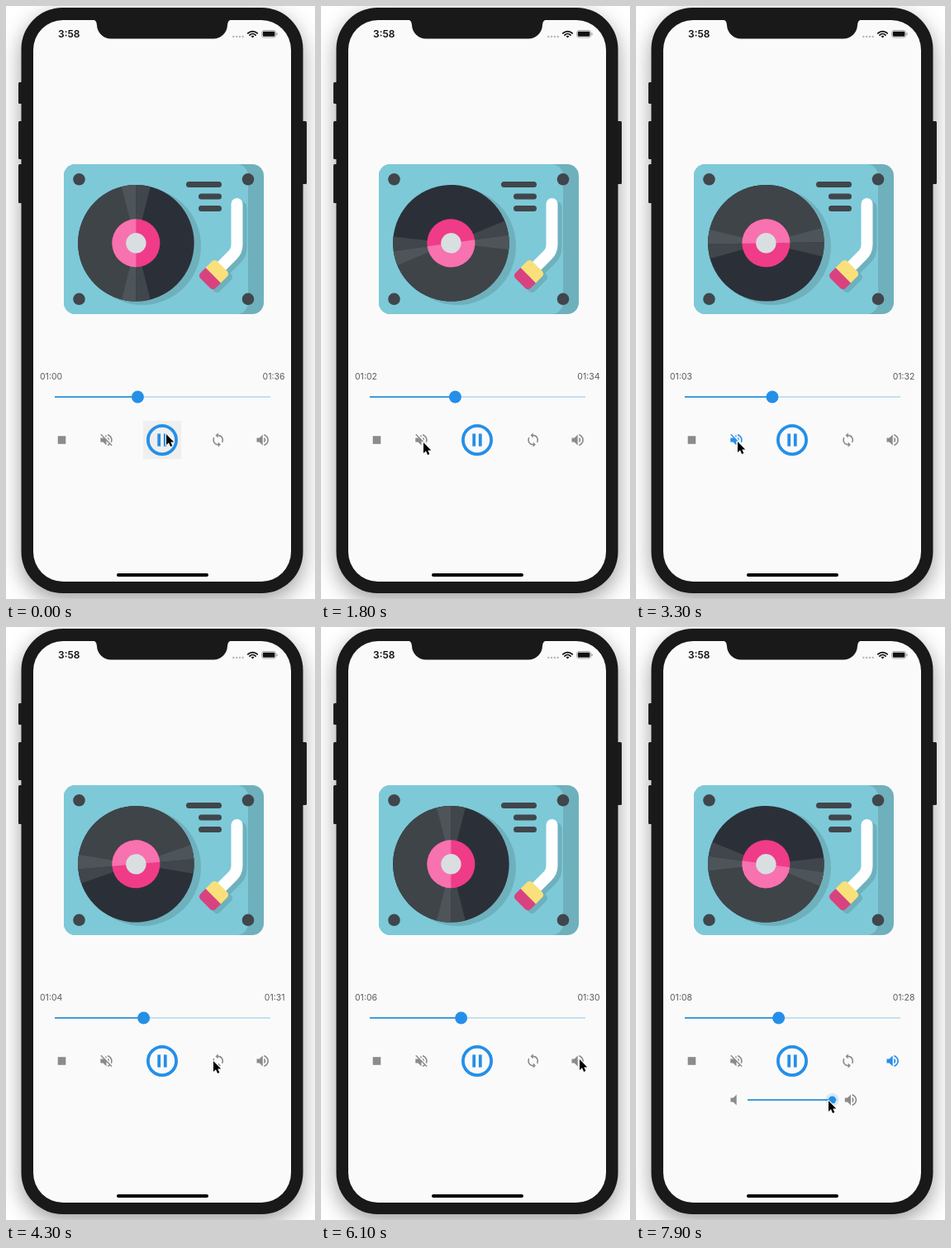
An HTML page with a canvas for the animation above (8000 ms loop, 374x716 px).

```html
<!DOCTYPE html>
<html lang="en">
<head>
<meta charset="utf-8">
<title>Music player</title>
<style>
html, body { margin: 0; width: 100%; height: 100%; overflow: hidden; background: #fff; }
canvas { display: block; width: 374px; height: 716px; }
</style>
</head>
<body>
<canvas id="stage"></canvas>
<script>
const W = 374, H = 716, LOOP = 8000, TAU = Math.PI * 2;
const BLUE = '#258fe8', GREY = '#8b8b8b', SLATE = '#40464b', TEAL = '#7dc9d8', SHADE = '#6fb0bd';
const canvas = document.getElementById('stage');
const ctx = canvas.getContext('2d');
const dpr = window.devicePixelRatio || 1;
canvas.width = W * dpr;
canvas.height = H * dpr;

// 24-unit icons
const icons = {
  stop: 'M6 6h12v12H6z',
  off: 'M16.5 12c0-1.77-1.02-3.29-2.5-4.03v2.21l2.45 2.45c.03-.2.05-.41.05-.63zm2.5 0c0 .94-.2 1.82-.54 2.64l1.51 1.51C20.63 14.91 21 13.5 21 12c0-4.28-2.99-7.86-7-8.77v2.06c2.89.86 5 3.54 5 6.71zM4.27 3L3 4.27 7.73 9H3v6h4l5 5v-6.73l4.25 4.25c-.67.52-1.42.93-2.25 1.18v2.06c1.38-.31 2.63-.95 3.69-1.81L19.73 21 21 19.73l-9-9L4.27 3zM12 4L9.91 6.09 12 8.18V4z',
  loop: 'M12 4V1L8 5l4 4V6c3.31 0 6 2.69 6 6 0 1.01-.25 1.97-.7 2.8l1.46 1.46C19.54 15.03 20 13.57 20 12c0-4.42-3.58-8-8-8zm0 14c-3.31 0-6-2.69-6-6 0-1.01.25-1.97.7-2.8L5.24 7.74C4.46 8.97 4 10.43 4 12c0 4.42 3.58 8 8 8v3l4-4-4-4v3z',
  up: 'M3 9v6h4l5 5V4L7 9H3zm13.5 3c0-1.77-1.02-3.29-2.5-4.03v8.05c1.48-.73 2.5-2.25 2.5-4.02zM14 3.23v2.06c2.89.86 5 3.54 5 6.71s-2.11 5.85-5 6.71v2.06c4.01-.91 7-4.49 7-8.77s-2.99-7.86-7-8.77z',
  low: 'M7 9v6h4l5 5V4l-5 5H7z'
};
for (const k in icons) icons[k] = new Path2D(icons[k]);
const arrow = new Path2D('M0 0V13L3 10.2 5.1 15 7.4 14 5.3 9.4H9.3z');

const spin = [[0, 0], [1.8, 622], [3.3, 1169], [4.3, 1525], [6.1, 2160], [7.2, 2552], [8, 2833]];
const pointer = [
  [0, 194, 517], [0.4, 194, 517], [1.3, 124, 527], [1.9, 124, 527], [2.2, 123, 526], [3.6, 123, 526],
  [4.2, 251, 524], [5.3, 251, 524], [5.9, 313, 522], [6.6, 313, 522], [7.2, 257, 557],
  [7.5, 240, 571], [7.6, 239, 572], [7.9, 233, 572]
];

function keyed(keys, t, col, ease = u => u) {
  const i = keys.findIndex(k => k[0] > t);
  if (i < 0) return keys[keys.length - 1][col];
  const a = keys[i - 1], b = keys[i];
  return a[col] + (b[col] - a[col]) * ease((t - a[0]) / (b[0] - a[0]));
}
const smooth = u => u * u * (3 - 2 * u);
const within = (t, a, b) => t >= a && t < b;

function box(x, y, w, h, r, fill) {
  ctx.fillStyle = fill;
  ctx.beginPath();
  ctx.roundRect(x, y, w, h, r);
  ctx.fill();
}
function dot(x, y, r, fill) {
  ctx.fillStyle = fill;
  ctx.beginPath();
  ctx.arc(x, y, r, 0, TAU);
  ctx.fill();
}
function sector(r, from, to, fill) {
  ctx.fillStyle = fill;
  ctx.beginPath();
  ctx.moveTo(0, 0);
  ctx.arc(0, 0, r, from, to);
  ctx.fill();
}
function icon(name, x, y, fill = GREY) {
  ctx.save();
  ctx.translate(x, y);
  ctx.scale(0.8, 0.8);
  ctx.translate(-12, -12);
  ctx.fillStyle = fill;
  ctx.fill(icons[name]);
  ctx.restore();
}
function text(str, x, y, font, fill, align = 'left') {
  ctx.font = font + ' Inter, "Liberation Sans", sans-serif';
  ctx.textAlign = align;
  ctx.fillStyle = fill;
  ctx.fillText(str, x, y);
}
function clock(s) {
  const n = Math.floor(s), two = v => String(v).padStart(2, '0');
  return two(Math.floor(n / 60)) + ':' + two(n % 60);
}

function phone() {
  ctx.fillStyle = '#fff';
  ctx.fillRect(0, 0, W, H);
  for (const [y, h] of [[92, 26], [139, 46], [191, 47]]) box(15, y, 6, h, 1.5, '#222');
  box(357, 139, 7, 76, 1.5, '#222');
  ctx.save();
  ctx.shadowColor = 'rgba(0,0,0,.38)';
  ctx.shadowBlur = 26 * dpr;
  ctx.shadowOffsetY = 9 * dpr;
  box(18.5, 2, 341, 707, 50, '#191919');
  ctx.restore();
  box(33, 17, 312, 678, 36, '#fafafa');

  // notch with flared shoulders
  ctx.fillStyle = '#191919';
  ctx.beginPath();
  ctx.moveTo(104, 16);
  ctx.lineTo(274, 16);
  ctx.quadraticCurveTo(268, 17, 268, 23);
  ctx.arcTo(268, 39.5, 250, 39.5, 17);
  ctx.arcTo(110, 39.5, 110, 22, 17);
  ctx.lineTo(110, 23);
  ctx.quadraticCurveTo(110, 17, 104, 16);
  ctx.fill();

  text('3:58', 63, 38, '600 12px', '#111');
  for (let i = 0; i < 4; i++) dot(275.3 + i * 3.8, 37, 1.2, '#b9b9b9');
  ctx.save();
  ctx.translate(298.5, 38.6);
  ctx.strokeStyle = '#111';
  ctx.lineWidth = 1.8;
  for (const r of [5, 8]) {
    ctx.beginPath();
    ctx.arc(0, 0, r, -Math.PI * 0.75, -Math.PI * 0.25);
    ctx.stroke();
  }
  sector(2.8, -Math.PI * 0.75, -Math.PI * 0.25, '#111');
  ctx.restore();
  ctx.strokeStyle = '#999';
  ctx.lineWidth = 0.8;
  ctx.beginPath();
  ctx.roundRect(309.6, 29.6, 17, 8.4, 2.5);
  ctx.stroke();
  box(310.8, 30.8, 14.6, 6, 1.4, '#111');
  box(327.4, 32.3, 1.2, 3, 0.6, '#999');
  box(134, 685, 111, 4, 2, '#000');
}

function armPath(dx, dy, color) {
  ctx.strokeStyle = color;
  ctx.lineWidth = 14;
  ctx.lineCap = 'round';
  ctx.lineJoin = 'round';
  ctx.beginPath();
  ctx.moveTo(279.5 + dx, 239 + dy);
  ctx.lineTo(279.5 + dx, 288 + dy);
  ctx.quadraticCurveTo(279.5 + dx, 296 + dy, 274 + dx, 301 + dy);
  ctx.lineTo(260 + dx, 315 + dy);
  ctx.stroke();
}
function head(dx, dy, top, bottom) {
  ctx.save();
  ctx.translate(251.5 + dx, 324.5 + dy);
  ctx.rotate(Math.PI / 4);
  box(-13, -14.5, 26, 16, [4.5, 4.5, 0, 0], top);
  box(-13, 1, 26, 13.5, [0, 0, 4.5, 4.5], bottom);
  ctx.restore();
}

function turntable(angle) {
  box(70, 191, 242, 181, 14, SHADE);
  box(70, 191, 223, 181, 14, TEAL);
  for (const x of [88.5, 293]) for (const y of [209.3, 353.8]) dot(x, y, 7.3, SLATE);
  box(218, 212, 43, 7, 3.5, SLATE);
  for (const y of [226.6, 241]) box(233, y, 28, 7, 3.5, SLATE);

  dot(165, 290, 71, SHADE);
  ctx.save();
  ctx.translate(157.4, 286.3);
  ctx.rotate(angle);
  const q = Math.PI / 2, wedge = 0.25;
  sector(70.3, 0, TAU, '#2b3038');
  sector(70.3, q, 3 * q, '#3f4449');
  for (const a of [q, 3 * q]) {
    const s = a === q ? 1 : -1;
    sector(70.3, Math.min(a, a + s * wedge), Math.max(a, a + s * wedge), '#4d555a');
    sector(70.3, Math.min(a, a - s * wedge), Math.max(a, a - s * wedge), '#40464b');
  }
  sector(29, 0, TAU, '#f03b88');
  sector(29, q, 3 * q, '#f772ae');
  dot(0, 0, 12.2, '#d9dee1');
  ctx.restore();

  armPath(5, 4, SHADE);
  head(5, 4, SHADE, SHADE);
  armPath(0, 0, '#fff');
  head(0, 0, '#fae07a', '#d8437f');
}

function controls(t, mx) {
  const pos = 60.22 + t, total = 156.47;
  text(clock(pos), 41, 451, '10.5px', '#5c5c5c');
  text(clock(total - pos), 337.5, 451, '10.5px', '#5c5c5c', 'right');
  const x = 59 + 261 * pos / total;
  box(59, 471, 261, 2, 0, '#c0e1f3');
  box(59, 471, x - 59, 2, 0, '#3f9cda');
  dot(x, 472, 7.5, BLUE);

  const glow = Math.max(0, 1 - t / 0.5);
  if (glow) box(166, 501, 46, 46, 0, `rgba(0,0,0,${0.045 * glow})`);
  ctx.strokeStyle = BLUE;
  ctx.lineWidth = 3.8;
  ctx.beginPath();
  ctx.arc(189, 524, 17.1, 0, TAU);
  ctx.stroke();
  box(183.3, 516.4, 3.8, 15.2, 0, BLUE);
  box(190.9, 516.4, 3.8, 15.2, 0, BLUE);

  const volume = t >= 6.5;
  icon('stop', 67.5, 524);
  icon('off', 121.5, 524, within(t, 2.2, 3.5) ? BLUE : GREY);
  icon('loop', 256.7, 524, within(t, 4.6, 5.2) ? BLUE : GREY);
  icon('up', 310.7, 524, volume ? BLUE : GREY);
  if (!volume) return;

  const drag = t >= 7.6;
  const v = drag ? Math.min(243.5, mx + 4.5) : 243.5;
  icon('low', 118.5, 571);
  icon('up', 260, 571);
  box(135, 570, 108.5, 2, 0, '#c0e1f3');
  box(135, 570, v - 135, 2, 0, '#3f9cda');
  if (drag) dot(v, 571, 8, 'rgba(37,143,232,.16)');
  dot(v, 571, 4.6, BLUE);
}

function cursor(x, y) {
  ctx.save();
  ctx.translate(x, y);
  ctx.lineJoin = 'round';
  ctx.strokeStyle = '#fff';
  ctx.lineWidth = 2;
  ctx.stroke(arrow);
  ctx.fillStyle = '#000';
  ctx.fill(arrow);
  ctx.restore();
}

function draw(now) {
  const t = Math.floor((now % LOOP) / 100) / 10;
  const mx = keyed(pointer, t, 1, smooth), my = keyed(pointer, t, 2, smooth);
  ctx.setTransform(dpr, 0, 0, dpr, 0, 0);
  phone();
  turntable(keyed(spin, t, 1) * Math.PI / 180);
  controls(t, mx);
  cursor(mx, my);
}

const start = performance.now();
function tick() {
  draw(performance.now() - start);
  requestAnimationFrame(tick);
}
tick();
</script>
</body>
</html>
```
